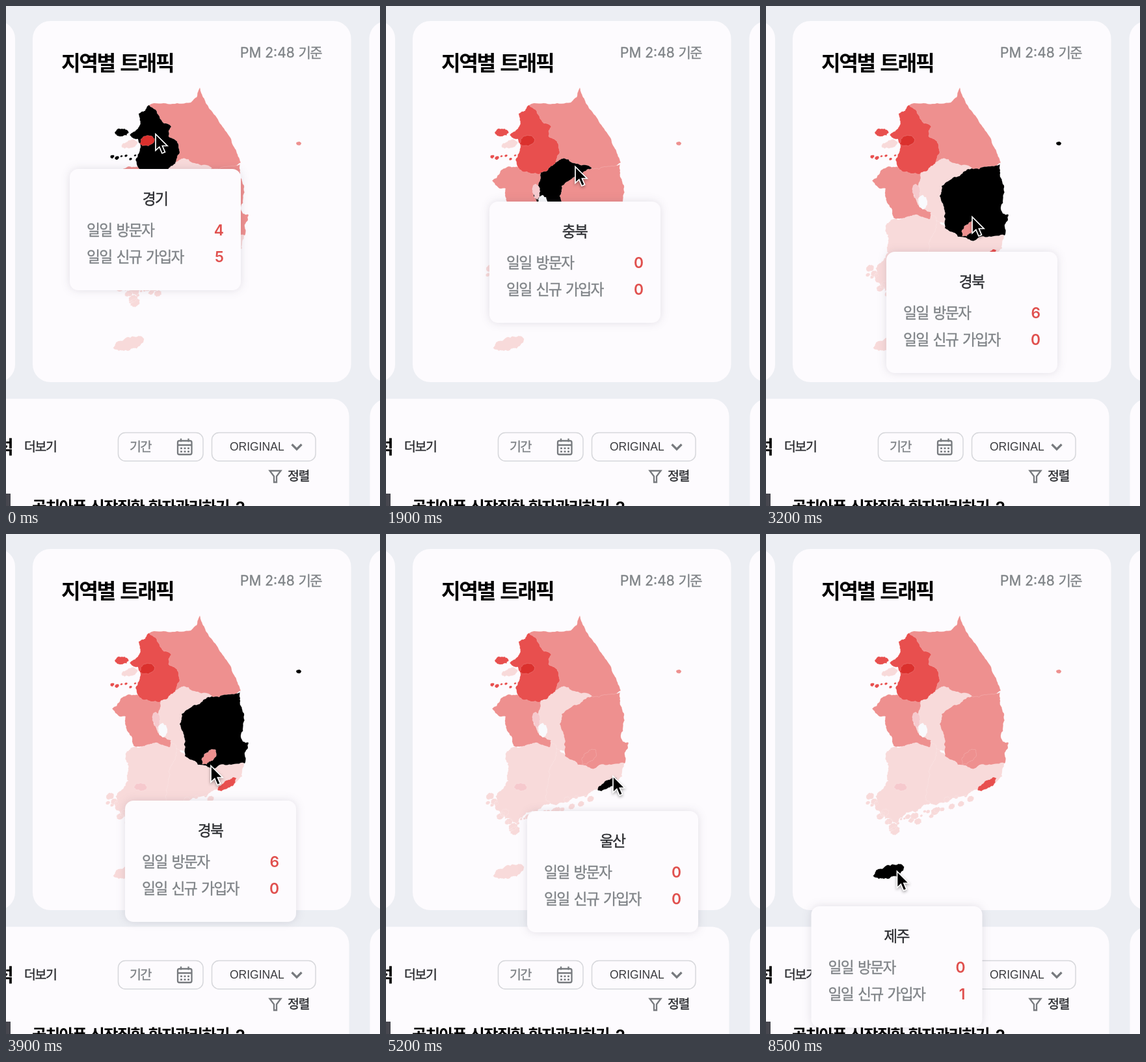
Animation, 575 px wide and 767 px high, one loop 8.6 s. Source, as an HTML page:

```html
<!DOCTYPE html>
<html lang="ko">
<head>
<meta charset="utf-8">
<style>
  html, body { margin: 0; width: 100%; height: 100%; overflow: hidden; background: #eceef3; }
  svg { display: block; width: 575px; height: 767px; font-family: Inter, "Noto Sans CJK KR", "Noto Sans CJK", sans-serif; }
  .card, .tip { fill: #fdfbfe; }
  .tip { filter: drop-shadow(0 0 7px rgba(40, 30, 60, .13)); }
  .ko { letter-spacing: -.075em; word-spacing: .1em; }
  .bold { font-weight: 700; }
  .gray { fill: #7f8387; stroke: #7f8387; stroke-width: .35; }
  .dark { fill: #2b2c30; stroke: #2b2c30; stroke-width: .35; }
  .value { fill: #e0504e; font-weight: 600; text-anchor: end; }
  .box { fill: none; stroke: #d6d7db; stroke-width: 1.5; }
  .icon { fill: none; stroke: #777a7e; stroke-width: 2.3; }
  #map path { stroke: rgba(255, 255, 255, .35); stroke-width: .5; }
  #cursor { filter: drop-shadow(0 2px 2px rgba(0, 0, 0, .35)); }
</style>
</head>
<body>
<svg viewBox="0 0 575 767">
  <g class="card">
    <rect x="-200" y="23" width="214" height="554" rx="27"/>
    <rect x="41" y="23" width="489.5" height="554" rx="27"/>
    <rect x="558.5" y="23" width="200" height="554" rx="27"/>
    <rect x="-200" y="602.5" width="727.5" height="300" rx="27"/>
    <rect x="559.5" y="602.5" width="200" height="300" rx="27"/>
  </g>

  <text class="ko bold" x="85" y="99" font-size="32.3">지역별 트래픽</text>
  <text class="gray" x="360" y="79" font-size="21">PM 2:48 <tspan class="ko">기준</tspan></text>

  <text class="ko bold" x="-14" y="687" font-size="28">석</text>
  <text class="ko dark" x="28" y="683" font-size="19.5">더보기</text>
  <rect class="box" x="172.5" y="654.5" width="130.5" height="43.5" rx="11"/>
  <text class="ko gray" x="190" y="683" font-size="19.5">기간</text>
  <g class="icon">
    <rect x="264" y="667" width="21.5" height="21" rx="2.5"/>
    <path d="M264 673.5h21.5M269 663.5v5M280.5 663.5v5"/>
    <path d="M268 678.5h14M268 683.5h14" stroke-dasharray="3 2.5"/>
  </g>
  <rect class="box" x="316.5" y="654.5" width="159.500" height="43.5" rx="11"/>
  <text x="344" y="682" font-size="17.5" fill="#3a3b3e" font-family="Liberation Sans, sans-serif">ORIGINAL</text>
  <path class="icon" style="stroke-width:3.2" d="M439.5 672.5l7.5 7.5 7.5-7.5"/>
  <path class="icon" d="M405.5 713h17l-6.5 8.5v9h-4v-9z"/>
  <text class="ko dark" x="433" y="728" font-size="19.5">정렬</text>
  <rect y="748" width="7" height="19" fill="#47474f"/>
  <text class="ko bold" x="40" y="778" font-size="24.5">골치아픈 신장질환 환자관리하기_2</text>

  <g id="map"></g>

  <g id="tooltip" font-size="22.8">
    <rect class="tip" width="263" height="186" rx="13"/>
    <text class="ko dark" id="region" x="131" y="54" text-anchor="middle"></text>
    <text class="ko gray" x="26" y="101.5">일일 방문자</text>
    <text class="value" id="visits" x="237" y="101.5"></text>
    <text class="ko gray" x="26" y="142.5">일일 신규 가입자</text>
    <text class="value" id="signups" x="237" y="142.5"></text>
  </g>
  <path id="cursor" d="M0 0V25L5.8 19.6 10 29.5 14.5 27.6 10.4 18H18Z" stroke="#fff" stroke-width="1.7"/>
</svg>

<script>
const $ = id => document.getElementById(id);
const PALE = '#f8dada', PINK = '#f6c9cd', ROSE = '#ee908f', RED = '#e84f4e', DEEP = '#db302d';
const LOOP = 8600, STEP = 100;

let seed = 7;
const random = () => (seed = seed * 16807 % 2147483647) / 2147483647;

// Ragged closed outline: each pass bends every edge at its middle.
function ragged(ring, wobble) {
  for (let pass = 0; pass < 4; pass++) {
    ring = ring.flatMap(([x, y], i) => {
      const [nx, ny] = ring[(i + 1) % ring.length];
      const dx = nx - x, dy = ny - y;
      const bend = (random() - .5) * wobble * Math.min(1, 24 / Math.hypot(dx, dy));
      return [[x, y], [x + dx / 2 - dy * bend, y + dy / 2 + dx * bend]];
    });
  }
  return 'M' + ring.map(p => p.map(v => v.toFixed(1))).join(' ') + 'Z';
}

const land = (corners, wobble = .3) => ragged(corners.split(' ').map(p => p.split(',').map(Number)), wobble);

function blob(cx, cy, rx, ry, tilt = 0) {
  const cos = Math.cos(tilt), sin = Math.sin(tilt);
  return ragged(Array.from({ length: 8 }, (_, i) => {
    const u = rx * Math.cos(i * Math.PI / 4), v = ry * Math.sin(i * Math.PI / 4);
    return [cx + u * cos - v * sin, cy + u * sin + v * cos];
  }), .35);
}

// Small islands strewn along a line.
const islands = (count, x0, y0, x1, y1, spread) => Array.from({ length: count }, (_, i) => {
  const t = (i + .5) / count, size = 1.2 + random() * spread / 4;
  return blob(x0 + (x1 - x0) * t, y0 + (y1 - y0) * t + (random() - .5) * spread, size * 1.3, size, -.5);
}).join('');

// Painted in order, so each region trims the ones below it.
const regions = [
  ['강원', ROSE, land('220,152 228,149 284,148 293,140 298,125 313,158 345,202 361,240 345,254 275,250 240,240 225,190', .15)],
  ['충북', PALE, land('225,250 262,240 275,234 316,248 310,300 290,335 262,332 240,325 225,290')],
  ['전라', PALE, land('192,328 215,318 240,316 270,335 262,378 254,412 230,427 200,444 170,424 178,392 188,362 184,342', .5)
    + islands(14, 155, 408, 200, 455, 24) + islands(12, 200, 446, 262, 424, 16)],
  ['경남', PALE, land('262,329 290,340 360,335 366,352 363,372 326,392 304,402 262,416 246,408 250,378 257,350', .35)
    + islands(8, 260, 418, 318, 404, 14)],
  ['충남', ROSE, land('163,268 186,247 225,250 238,257 227,292 236,308 254,316 252,327 222,322 196,325 187,303 184,280 172,278')],
  ['세종', PINK, blob(231, 285, 6, 12, -.1)],
  ['대전', '#f9fafd', blob(241, 301, 7, 11)],
  ['경북', ROSE, land('361,241 360,262 366,275 364,318 373,320 367,352 320,360 295,354 275,341 275,316 267,292 270,276 294,262 316,249')
    + blob(450, 211, 4, 3)],
  ['대구', ROSE, blob(312, 342, 15, 8, -.8)],
  ['경기', RED, land('220,152 254,185 250,200 265,212 260,242 236,258 210,254 199,236 206,219 203,204 190,198 205,184 204,165')
    + blob(178, 194, 11, 6) + islands(6, 160, 231, 202, 233, 8)],
  ['인천', PALE, blob(190, 212, 13, 6, -.3)],
  ['서울', DEEP, blob(217, 207, 12, 8, -.3)],
  ['광주', PINK, blob(207, 388, 10, 6)],
  ['울산', RED, blob(340, 384, 17, 6, -.57)],
  ['제주', PALE, blob(188.5, 517.5, 25, 10, -.28)]
];

const stats = { 경기: [4, 5], 강원: [5, 0], 충북: [0, 0], 경북: [6, 0], 경남: [0, 0], 울산: [0, 0], 제주: [0, 1] };

// Pointer stops: arrival, departure, position, and the region hovered from arrival on.
const stops = [
  [0, 600, 229.5, 196, '경기'],
  [1100, 1300, 331, 205, '강원'],
  [1800, 2200, 290.5, 246, '충북'],
  [2600, 3300, 316.5, 323, '경북'],
  [3900, 3900, 314.5, 355, '경북'],
  [4600, 5300, 348.5, 371, '울산'],
  [6200, 6500, 282, 506, ''],
  [7200, LOOP, 201, 517, '제주']
];

const shapes = regions.map(([name, fill, d]) => {
  const path = document.createElementNS('http://www.w3.org/2000/svg', 'path');
  path.setAttribute('d', d);
  $('map').append(path);
  return { name, fill, path };
});

function pointerAt(time) {
  const i = stops.findLastIndex(stop => stop[0] <= time);
  const [, leave, x, y, region] = stops[i];
  if (time <= leave) return { x, y, region };
  const [arrive, , nextX, nextY, nextRegion] = stops[i + 1];
  const u = (time - leave) / (arrive - leave), ease = u * u * (3 - 2 * u);
  return { x: x + (nextX - x) * ease, y: y + (nextY - y) * ease, region: u < .5 ? region : nextRegion };
}

function draw(time) {
  const { x, y, region } = pointerAt(time);
  for (const { name, fill, path } of shapes) path.setAttribute('fill', name === region ? '#000' : fill);
  $('cursor').setAttribute('transform', `translate(${x + .5} ${y + .5})`);
  $('tooltip').setAttribute('transform', `translate(${x - 131.5} ${y + 54})`);
  $('tooltip').style.display = region ? '' : 'none';
  if (region) {
    $('region').textContent = region;
    [$('visits').textContent, $('signups').textContent] = stats[region];
  }
}

function tick() {
  draw(Math.floor(performance.now() % LOOP / STEP) * STEP);
  requestAnimationFrame(tick);
}
tick();
</script>
</body>
</html>
```
